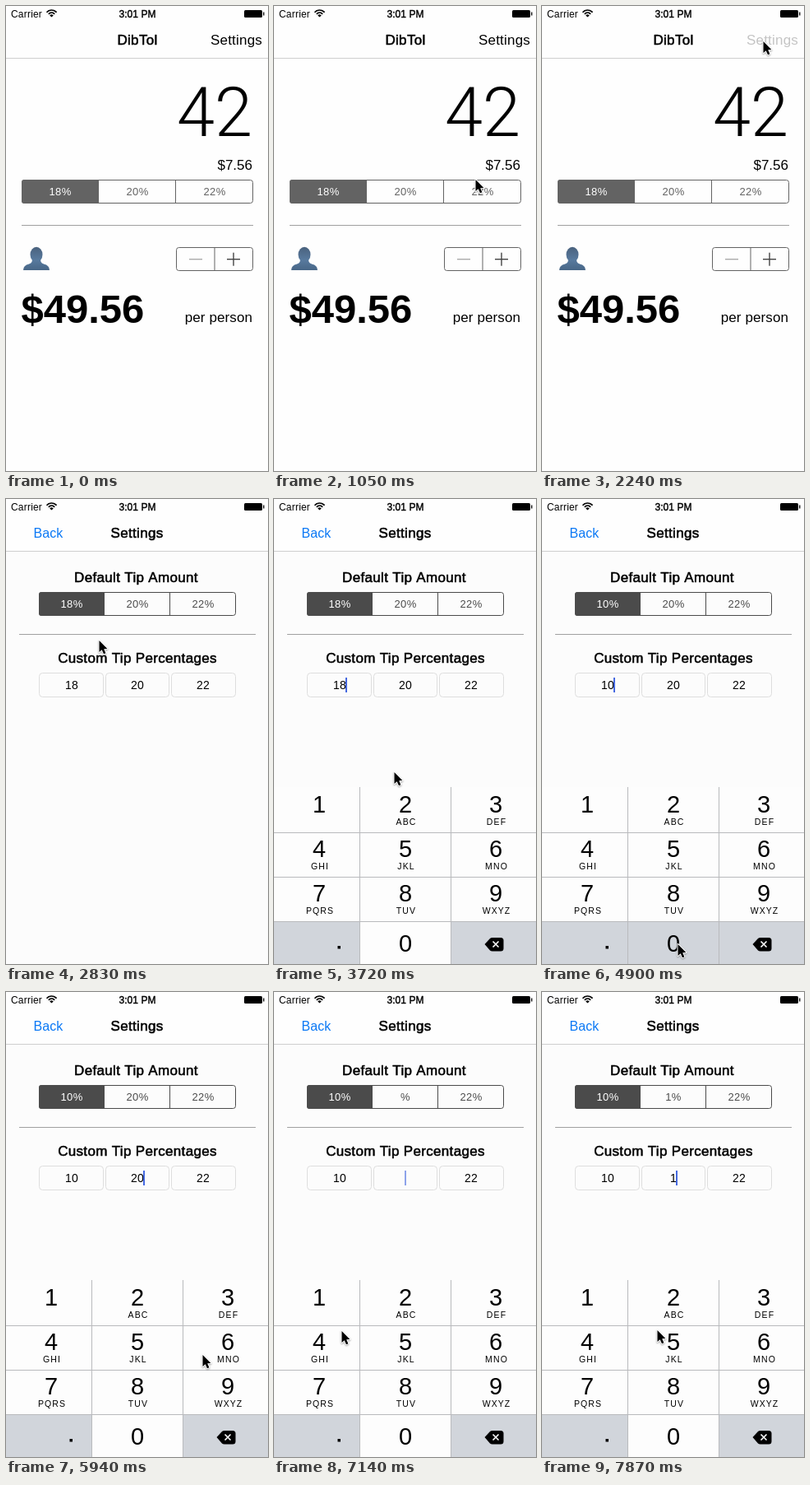
An HTML page with a canvas for the animation above (8 s loop, 319x565 px).

```html
<!DOCTYPE html>
<html lang="en">
<head>
<meta charset="utf-8">
<title>Tip calculator</title>
<style>
  html, body { margin: 0; width: 100%; height: 100%; overflow: hidden; background: #fefefe; }
  canvas { display: block; }
</style>
</head>
<body>
<canvas id="stage" width="319" height="565"></canvas>
<script>
const W = 319, H = 565, LOOP = 8000, TICK = 148.5;
const ctx = document.getElementById('stage').getContext('2d');
const SANS = '"Liberation Sans", Arial, sans-serif';
const LIGHT = 'Roboto, "Liberation Sans", sans-serif';
const KEY_GREY = '#d1d5db';

// Pointer stops: tick, x, y
const POINTER = [
  [1, 243, 475], [2, 191, 462], [4, 191, 462], [5, 196, 440], [6, 214, 340],
  [7, 245, 210], [8, 284, 95], [9, 296, 52], [10, 269, 42], [15, 269, 42],
  [16, 262, 50], [18, 180, 130], [19, 113, 171], [20, 90, 202], [22, 81, 221],
  [24, 81, 221], [26, 210, 440], [28, 269, 520], [29, 269, 520], [30, 234, 530],
  [32, 165, 540], [33, 165, 540], [35, 170, 380], [37, 169, 226], [38, 169, 226],
  [40, 239, 440], [42, 272, 528], [43, 276, 533], [45, 276, 533], [46, 255, 515],
  [48, 82, 411], [50, 56, 376], [51, 56, 376], [52, 75, 385], [53, 140, 410]
];
const TYPING = [23, 29, 33, 38, 42, 43, 51];
const PRESSED = { 29: 'del', 33: '0', 42: 'del', 43: 'del', 51: '1' };
const LETTERS = ['', 'ABC', 'DEF', 'GHI', 'JKL', 'MNO', 'PQRS', 'TUV', 'WXYZ'];

const clamp = v => Math.max(0, Math.min(1, v));
const easeOut = v => 1 - (1 - clamp(v)) ** 2;

function rect(x, y, w, h, color) {
  ctx.fillStyle = color;
  ctx.fillRect(x, y, w, h);
}

function text(str, x, y, size, o = {}) {
  const { color = '#000', align = 'left', weight = 400, family = SANS, space = 0, heavy = 0 } = o;
  ctx.font = `${weight} ${size}px ${family}`;
  ctx.letterSpacing = space + 'px';
  ctx.textAlign = align;
  ctx.fillStyle = color;
  ctx.fillText(str, x, y);
  if (heavy) {
    ctx.strokeStyle = color;
    ctx.lineWidth = heavy;
    ctx.lineJoin = 'round';
    ctx.strokeText(str, x, y);
  }
}

const title = (str, x, y) =>
  text(str, x, y, 17, { align: 'center', space: 0.33, heavy: 0.55 });

function roundBox(x, y, w, h, r, stroke) {
  ctx.beginPath();
  ctx.roundRect(x + 0.5, y + 0.5, w - 1, h - 1, r);
  ctx.strokeStyle = stroke;
  ctx.lineWidth = 1;
  ctx.stroke();
}

function segments(x, y, w, color, labels) {
  const part = w / 3;
  ctx.fillStyle = color;
  ctx.beginPath();
  ctx.roundRect(x, y, part, 29, [3, 0, 0, 3]);
  ctx.fill();
  roundBox(x, y, w, 29, 3, color);
  labels.forEach((label, i) => {
    if (i) rect(x + part * i - 1, y, 1, 29, color);
    text(label + '%', x + part * (i + 0.5), y + 19, 13,
      { color: i ? color : '#fff', align: 'center', space: 0.4 });
  });
}

function statusBar() {
  text('Carrier', 6, 14, 12, { space: 0.2 });
  text('3:01 PM', 160, 14, 12, { align: 'center', heavy: 0.4, space: 0.05 });
  ctx.strokeStyle = '#000';
  ctx.lineWidth = 1.7;
  for (const r of [4.8, 8]) {
    ctx.beginPath();
    ctx.arc(55.5, 13, r, -Math.PI * 0.77, -Math.PI * 0.23);
    ctx.stroke();
  }
  ctx.fillStyle = '#000';
  ctx.beginPath();
  ctx.moveTo(55.5, 13.5);
  ctx.arc(55.5, 13.5, 3, -Math.PI * 0.77, -Math.PI * 0.23);
  ctx.fill();
  ctx.beginPath();
  ctx.roundRect(290, 5, 22, 9, 1.5);
  ctx.fill();
  rect(313, 7.5, 1.5, 4, '#222');
}

function person() {
  const g = ctx.createLinearGradient(0, 293, 0, 321);
  g.addColorStop(0, '#4a627e');
  g.addColorStop(0.55, '#587a9e');
  g.addColorStop(1, '#486787');
  ctx.fillStyle = g;
  ctx.beginPath();
  ctx.ellipse(37, 302, 7.5, 9.3, 0, 0, Math.PI * 2);
  ctx.fill();
  ctx.beginPath();
  ctx.moveTo(32, 305);
  ctx.lineTo(42, 305);
  ctx.quadraticCurveTo(41, 312, 46, 313.5);
  ctx.quadraticCurveTo(53, 315, 53, 321);
  ctx.lineTo(21, 321);
  ctx.quadraticCurveTo(21, 315, 28, 313.5);
  ctx.quadraticCurveTo(33, 312, 32, 305);
  ctx.fill();
}

function billPage() {
  const grey = '#636363';
  text('42', 300, 158, 83, { align: 'right', weight: 300, family: LIGHT });
  text('$7.56', 300, 199, 17, { align: 'right' });
  segments(19, 211, 282, grey, ['18', '20', '22']);
  rect(19, 266, 282, 1, '#a0a0a0');
  person();
  roundBox(207, 293, 94, 29, 3, grey);
  rect(253.5, 293, 1, 29, grey);
  rect(223, 307, 16, 1.4, '#aaa');
  rect(269, 307, 16, 1.4, '#444');
  rect(276.3, 299.7, 1.4, 16, '#444');
  text('$49.56', 18.5, 385, 49, { weight: 700 });
  text('per person', 300, 384, 17, { align: 'right', space: 0.1 });
}

function settingsPage(fields, active, caret) {
  title('Default Tip Amount', 158.5, 101);
  segments(40, 113, 240, '#4b4b4b', fields);
  rect(16, 164, 288, 1, '#a0a0a0');
  title('Custom Tip Percentages', 160, 199);
  fields.forEach((value, i) => {
    const mid = 80 + 80 * i;
    roundBox(i ? mid - 39 : 40, 211, i === 1 ? 78 : 79, 30, 4, '#dedede');
    text(value, mid, 231, 14, { align: 'center', space: 0.2 });
    if (i === active) {
      ctx.globalAlpha = caret;
      rect(Math.round(mid - 1 + value.length * 4), 217, 2, 18, '#4569e0');
      ctx.globalAlpha = 1;
    }
  });
}

function deleteIcon() {
  ctx.fillStyle = '#000';
  ctx.beginPath();
  ctx.moveTo(256.5, 541);
  ctx.lineTo(263, 534);
  ctx.quadraticCurveTo(264, 533, 266, 533);
  ctx.lineTo(276, 533);
  ctx.quadraticCurveTo(279.5, 533, 279.5, 536.5);
  ctx.lineTo(279.5, 546);
  ctx.quadraticCurveTo(279.5, 549.5, 276, 549.5);
  ctx.lineTo(266, 549.5);
  ctx.quadraticCurveTo(264, 549.5, 263, 548.5);
  ctx.fill();
  ctx.strokeStyle = '#fff';
  ctx.lineWidth = 1.6;
  ctx.beginPath();
  ctx.moveTo(266.5, 537.5); ctx.lineTo(273.5, 544.5);
  ctx.moveTo(273.5, 537.5); ctx.lineTo(266.5, 544.5);
  ctx.stroke();
}

function keypad(dy, pressed) {
  const left = [0, 104, 215, W], mids = [55, 160, 270];
  const top = r => 351 + 54 * r;
  const digit = (d, x, y) => text(d, x, y, 29, { align: 'center' });
  const cell = (c, r, color) =>
    rect(left[c], top(r), left[c + 1] - left[c], r < 3 ? 54 : 53, color);

  ctx.save();
  ctx.translate(0, dy);
  rect(0, 350, W, 215, '#fdfdfd');
  cell(0, 3, KEY_GREY);
  if (pressed !== 'del') cell(2, 3, KEY_GREY);
  if (pressed === '0') cell(1, 3, KEY_GREY);
  if (pressed === '1') cell(0, 0, KEY_GREY);
  for (let r = 1; r < 4; r++) rect(0, top(r), W, 1, '#b9babd');
  for (const x of [104, 215]) rect(x, 350, 1, 215, '#b9babd');

  LETTERS.forEach((letters, i) => {
    const x = mids[i % 3], y = 381 + 54 * Math.floor(i / 3);
    digit(String(i + 1), x, y);
    text(letters, x + 1, y + 15, 10.5, { align: 'center', space: 1.1 });
  });
  digit('0', 160, 550);
  rect(77.5, 543, 3.5, 3.5, '#000');
  deleteIcon();
  ctx.restore();
}

function pointer(n) {
  if (n < 1) return;
  const i = POINTER.findLastIndex(p => p[0] <= n);
  const a = POINTER[i], b = POINTER[i + 1] || a;
  const k = b === a ? 0 : (n - a[0]) / (b[0] - a[0]);
  const x = a[1] + (b[1] - a[1]) * k;
  const y = a[2] + (b[2] - a[2]) * k;

  ctx.save();
  ctx.translate(Math.round(x), Math.round(y) + 1);
  ctx.beginPath();
  ctx.moveTo(0.5, 0);
  [[0.5, 14], [3.7, 11.2], [6, 16.2], [8.4, 15.2], [6.2, 10.2], [10.4, 10]]
    .forEach(p => ctx.lineTo(...p));
  ctx.closePath();
  ctx.shadowColor = 'rgba(0,0,0,.35)';
  ctx.shadowBlur = 2;
  ctx.shadowOffsetY = 1;
  ctx.strokeStyle = '#fff';
  ctx.lineWidth = 2;
  ctx.stroke();
  ctx.shadowColor = 'transparent';
  ctx.fillStyle = '#000';
  ctx.fill();
  ctx.restore();
}

function navBar(push, dim) {
  rect(0, 63, W, 1, '#cfcfcf');
  ctx.save();
  ctx.globalAlpha = 1 - push;
  ctx.translate(-100 * push, 0);
  title('DibTol', 160, 47);
  ctx.translate(100 * push, 0);
  text('Settings', 312, 47, 17, { align: 'right', space: 0.2, color: dim ? '#c4c4c4' : '#000' });
  ctx.globalAlpha = push;
  ctx.translate(130 * (1 - push), 0);
  title('Settings', 159.5, 47);
  text('Back', 33.5, 47, 16, { color: '#0a78f5', space: 0.1 });
  ctx.restore();
}

function values(n) {
  const first = n < 29 ? '18' : n < 33 ? '1' : '10';
  const second = n < 42 ? '20' : n < 43 ? '2' : n < 51 ? '' : '1';
  return [first, second, '22'];
}

function caretAlpha(n) {
  const idle = n - TYPING.findLast(k => k <= n);
  return idle < 5 ? 1 : clamp(Math.abs(idle - 6) * 0.6);
}

function draw(n) {
  const push = easeOut((n - 15) / 4);
  rect(0, 0, W, H, '#fefefe');
  if (push < 1) {
    ctx.save();
    ctx.translate(-W * 0.3 * push, 0);
    billPage();
    ctx.restore();
  }
  if (push > 0) {
    ctx.save();
    ctx.translate(Math.round(W * (1 - push)), 0);
    rect(0, 64, W, H, '#fcfcfc');
    settingsPage(values(n), n < 23 ? -1 : n < 38 ? 0 : 1, n < 23 ? 0 : caretAlpha(n));
    ctx.restore();
  }
  navBar(push, n >= 15);
  statusBar();
  if (n >= 23) keypad(Math.round(215 * (1 - easeOut((n - 22) / 3))), PRESSED[n]);
  pointer(n);
}

function loop(now) {
  draw(Math.floor((now % LOOP + 6) / TICK));
  requestAnimationFrame(loop);
}
draw(0);
requestAnimationFrame(loop);
</script>
</body>
</html>
```
